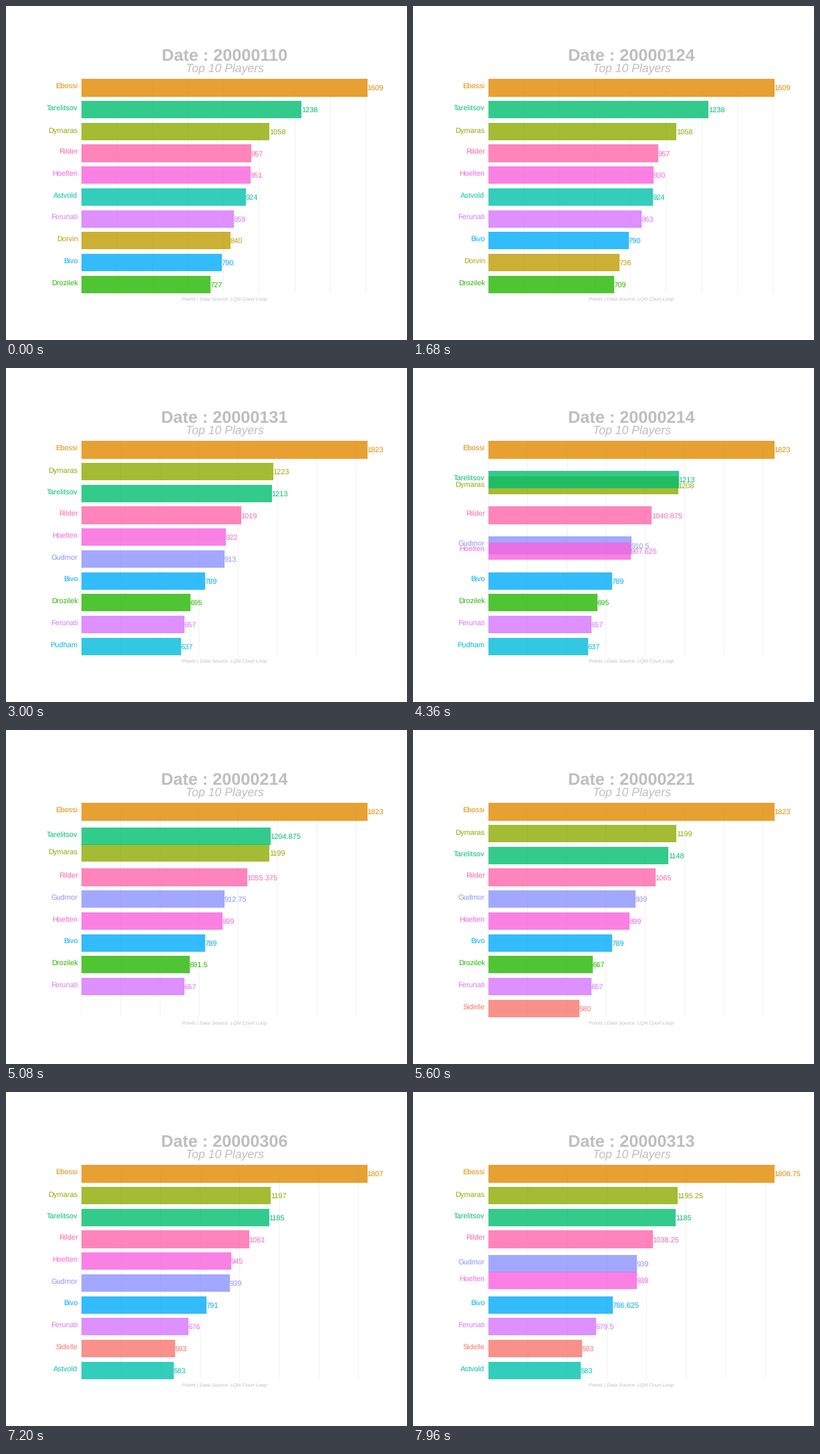
Animation of 600x500 px, one loop 8000 ms. Source, as a matplotlib script:

```python
import matplotlib.pyplot as plt
from matplotlib.animation import FuncAnimation
from matplotlib.patches import Rectangle

plt.rcParams["font.family"] = "Liberation Sans"
plt.rcParams["text.hinting"] = "none"

WIDTH, HEIGHT, DPI = 600, 500, 100
LEFT, RIGHT, TOP = 112.8, 541, 109.35
PITCH = 32.7
BAR = 0.8 * PITCH
BOTTOM = TOP + 9 * PITCH + BAR
GREY = "#BEBEBE"

# Frames per week, frames of movement, and where in a week the loop begins
PERIOD, MOVE, OFFSET = 22, 8, 6
FRAMES, INTERVAL = 200, 40

# Listed in drawing order, later ones on top
COLORS = {
    "Sidelle": "#F8766D", "Ebossi": "#E18A00", "Dorvin": "#BE9C00",
    "Dymaras": "#8CAB00", "Drozilek": "#24B700", "Tarelitsov": "#00BE70",
    "Astvold": "#00C1AB", "Pudham": "#00BBDA", "Bivo": "#00ACFC",
    "Gudmor": "#8B93FF", "Ferunati": "#D575FE", "Hoelten": "#F962DD",
    "Rilder": "#FF65AC",
}

START = dict(Ebossi=1609, Tarelitsov=1238, Dymaras=1058, Rilder=957,
             Hoelten=951, Astvold=924, Ferunati=859, Dorvin=840, Bivo=790,
             Drozilek=727)

# Weekly changes; None means the player leaves the chart
CHANGES = [
    ("0117", dict(Hoelten=930, Ferunati=863, Dorvin=736, Drozilek=709)),
    ("0124", {}),
    ("0131", dict(Ebossi=1823, Dymaras=1223, Tarelitsov=1213, Rilder=1019,
                  Hoelten=922, Gudmor=913, Bivo=789, Drozilek=695,
                  Ferunati=657, Pudham=637, Astvold=None, Dorvin=None)),
    ("0207", {}),
    ("0214", dict(Dymaras=1199, Rilder=1054, Gudmor=909, Hoelten=899)),
    ("0221", dict(Tarelitsov=1148, Rilder=1065, Gudmor=939, Drozilek=667,
                  Sidelle=580, Pudham=None)),
    ("0228", dict(Tarelitsov=1185, Rilder=1061, Hoelten=911, Ferunati=676,
                  Sidelle=630, Astvold=583, Drozilek=None)),
    ("0306", dict(Ebossi=1807, Dymaras=1197, Hoelten=945, Bivo=791,
                  Sidelle=593)),
    ("0313", dict(Ebossi=1809, Dymaras=1195, Rilder=1035, Hoelten=937,
                  Bivo=786, Ferunati=680)),
]


def with_ranks(points):
    order = sorted(points, key=points.get, reverse=True)
    return {name: (points[name], rank) for rank, name in enumerate(order)}


def build_weeks():
    points = dict(START)
    weeks = [("0110", with_ranks(points))]
    for date, change in CHANGES:
        points = {n: v for n, v in {**points, **change}.items() if v is not None}
        weeks.append((date, with_ranks(points)))
    return weeks


WEEKS = build_weeks()


def state_at(frame):
    """Date and {name: (points, rank)} shown at a frame."""
    index, step = divmod(frame + OFFSET, PERIOD)
    old_date, old = WEEKS[max(index - 1, 0)]
    new_date, new = WEEKS[index]
    date = new_date if step >= MOVE / 2 else old_date
    if step == 0:
        return date, old
    if step >= MOVE:
        return date, new
    t = step / MOVE
    mixed = {name: tuple(a + (b - a) * t for a, b in zip(old[name], new[name]))
             for name in old if name in new}
    return date, mixed


fig = plt.figure(figsize=(WIDTH / DPI, HEIGHT / DPI), dpi=DPI, facecolor="white")
ax = fig.add_axes([0, 0, 1, 1])


def write(x, y, text, size, color=GREY, ha="center", **style):
    ax.text(x, y, text, fontsize=size * 72 / DPI, color=color, ha=ha,
            va="baseline", **style)


def draw_grid(scale, top_value):
    gap = 200 if top_value < 1725 else 250
    for value in range(0, int(top_value) + 1, gap):
        x = LEFT + value * scale
        ax.plot([x, x], [TOP, BOTTOM], color=GREY, lw=0.213 * 72 / DPI,
                snap=False, solid_capstyle="butt", zorder=1)


def draw_bar(right, top, color):
    """A bar with its edges on whole pixels."""
    x0, x1, y0, y1 = (round(v) for v in (LEFT, right, top, top + BAR))
    ax.add_patch(Rectangle((x0, y0), x1 - x0, y1 - y0, facecolor=color,
                           alpha=0.8, lw=0, snap=False, zorder=2))


def draw(frame):
    ax.clear()
    ax.set(xlim=(0, WIDTH), ylim=(HEIGHT, 0))
    ax.axis("off")

    date, players = state_at(frame)
    top_value = max(points for points, _ in players.values())
    scale = (RIGHT - LEFT) / top_value
    draw_grid(scale, top_value)

    for name, color in COLORS.items():
        if name not in players:
            continue
        points, rank = players[name]
        top = TOP + rank * PITCH
        middle = top + BAR / 2
        right = LEFT + points * scale
        draw_bar(right, top, color)
        write(107.5, middle + 1.7, name, 11.04, color, "right")
        write(right - 0.6, middle + 3.95, f"{points:.10g}", 11.04, color, "left")

    write(327, 82, f"Date : 2000{date}", 25.2, weight="bold")
    write(327, 98, "Top 10 Players", 17.6, style="italic")
    write(327, 440, "Points | Data Source: LQN Court Loop", 7.5, style="italic")
    return []


anim = FuncAnimation(fig, draw, frames=FRAMES, interval=INTERVAL,
                     init_func=lambda: [], repeat=True, repeat_delay=0)
plt.show()
```
